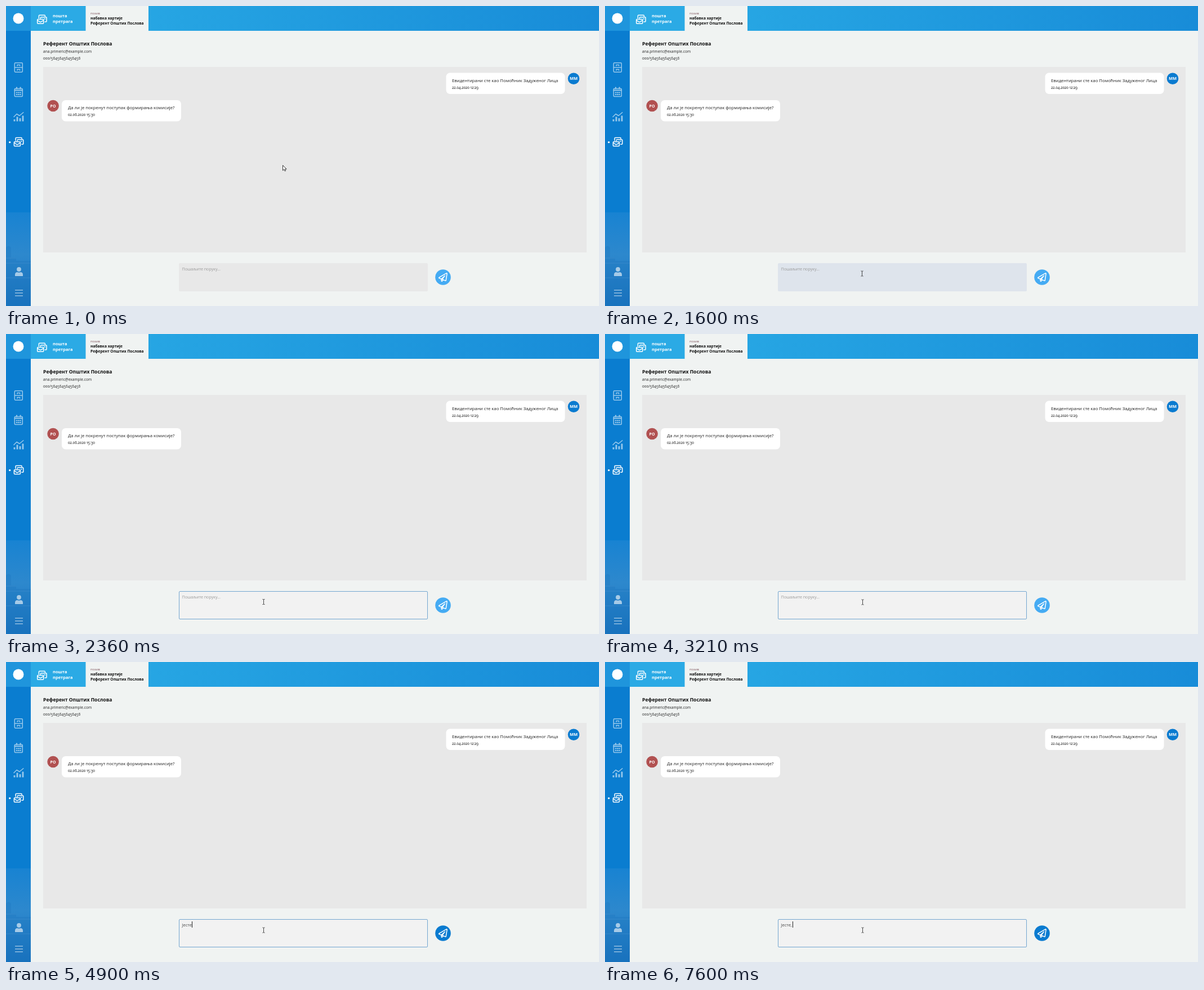
Animation, 1053 px wide and 532 px high, one loop 8000 ms. Source, as an HTML page:

```html
<!DOCTYPE html>
<html lang="sr">
<head>
<meta charset="utf-8">
<title>Порука</title>
<style>
  html, body { margin: 0; width: 100%; height: 100%; overflow: hidden; background: #f0f3f2; }
  svg { display: block; width: 100%; height: 100%; }
  text { font-family: "Open Sans", "Noto Sans", sans-serif; font-variant-numeric: oldstyle-nums; fill: #222; white-space: pre; }
  .bold { font-weight: 700; }
  .white { fill: #fff; }
  .message { font-size: 7.75px; }
  .date { font-size: 6.4px; fill: #111; }
  .contact { font-size: 6.6px; }
  .tab { font-size: 6.65px; fill: #111; }
  .nav { font-size: 7.5px; }
  .line { fill: none; stroke: #fff; stroke-width: 1.5; stroke-linejoin: round; stroke-linecap: round; }
  .dim { opacity: .58; }
</style>
</head>
<body>
<svg viewBox="0 0 1053 532">
  <defs>
    <linearGradient id="header">
      <stop offset="0" stop-color="#2aace6"/><stop offset="1" stop-color="#188cd8"/>
    </linearGradient>
    <linearGradient id="photo" x2="0" y2="1">
      <stop offset="0" stop-color="#1883d2"/><stop offset=".45" stop-color="#2d88cd"/><stop offset="1" stop-color="#1b75c0"/>
    </linearGradient>
    <g id="mail" class="line">
      <path d="M3.4 6V1.6q0-1 1-1h9q1 0 1 1v1"/>
      <path d="M6.4 6.3V5.2q0-1 1-1h8.7q1 0 1 1v6.2q0 1-1 1h-2M13.2 7.1h1.2"/>
      <rect x=".7" y="8" width="11" height="7.6" rx="1.1"/>
      <path d="M1 10l5.2 3 5.2-3"/>
    </g>
  </defs>

  <rect width="1053" height="532" fill="#f0f3f2"/>
  <rect x="44" width="1009" height="44" fill="url(#header)"/>
  <rect x="44" width="98" height="44" fill="#2baae5"/>
  <rect x="141.5" width="111.5" height="44" fill="#f0f3f2"/>

  <!-- sidebar -->
  <rect width="44" height="532" fill="#0a7dd0"/>
  <rect width="44" height="44" fill="#1f95dc"/>
  <circle cx="22" cy="22" r="9.5" fill="#fff"/>
  <rect y="366" width="44" height="166" fill="url(#photo)"/>
  <g fill="#0b62ae" opacity=".14">
    <path d="M0 446V428q5-5 9 0v18h9v6h26v80H0z"/>
    <path d="M4 462h4v15H4zM13 462h4v15h-4zM31 462h4v15h-4zM4 488h4v20H4zM13 488h4v20h-4zM31 488h4v20h-4z"/>
  </g>
  <path d="M0 447h18M0 456h44M0 482h44" stroke="#9cc9ee" opacity=".15"/>

  <g class="line dim">
    <rect x="15.3" y="100.8" width="14" height="16.4" rx="1.4"/>
    <path d="M15.3 109h14M20 106v-1.5h4.6v1.5M20 114v-1.5h4.6v1.5"/>
    <rect x="15.3" y="146.5" width="14" height="14" rx="1.2"/>
    <path d="M15.5 149.5h13.6M19 144.5v2M25.6 144.5v2" stroke-width="2.2"/>
    <path d="M18.6 153.5h1M21.8 153.5h1M25 153.5h1M18.6 157h1M21.8 157h1M25 157h1" stroke-width="1.9"/>
    <path d="M14 196.5l5-5 5 3 6.8-5.7"/>
    <path d="M15 201v3.5M20 196.5v8M25 199v5.5M30 194.5v10" stroke-width="2.8" stroke-linecap="butt"/>
  </g>
  <circle cx="6.7" cy="241.6" r="1.7" fill="#fff"/>
  <use href="#mail" x="13.7" y="232.8"/>
  <g fill="#fff" opacity=".6">
    <circle cx="23" cy="467" r="3.9"/>
    <path d="M16 479v-2.6q0-4.3 4.2-4.5 2.8 1.2 5.6 0 4.2.2 4.2 4.5V479z"/>
  </g>
  <path d="M16 503h14v1.8H16zM16 508h14v1.8H16zM16 513h14v1.8H16z" fill="#fff" opacity=".45"/>

  <!-- header -->
  <use href="#mail" x="55" y="15.6"/>
  <g class="bold">
    <text class="nav white" x="83" y="19.7">пошта</text>
    <text class="nav white" x="83" y="30.2">претрага</text>
    <text class="tab" x="150" y="23.5">набавка хартије</text>
    <text class="tab" x="150" y="33">Референт Општих Послова</text>
    <text x="66" y="69.6" font-size="8.6" style="fill:#111">Референт Општих Послова</text>
  </g>
  <text x="150" y="14.7" font-size="5.8" style="fill:#80565e">позив</text>
  <text class="contact" x="66" y="82.8">ana.primeric@example.com</text>
  <text class="contact" x="66" y="94.6">000/56456456456456</text>

  <!-- conversation -->
  <rect x="66" y="108" width="965" height="329" fill="#e8e8e8"/>
  <rect x="781.5" y="118.5" width="211" height="37.5" rx="7" fill="#fff"/>
  <text class="message" x="792" y="134.7">Евидентирани сте као Помоћник Задуженог Лица</text>
  <text class="date" x="792" y="146.8">22.04.2020 12:29</text>
  <circle cx="1008" cy="128.7" r="10.3" fill="#0a7bd0"/>
  <text class="bold white" x="1008" y="131.4" font-size="7.5" text-anchor="middle">ММ</text>
  <rect x="99" y="167" width="212" height="37.5" rx="7" fill="#fff"/>
  <text class="message" x="110" y="183.2">Да ли је покренут поступак формирања комисије?</text>
  <text class="date" x="110" y="195.2">02.06.2020 15:30</text>
  <circle cx="83.6" cy="177" r="10.3" fill="#b15151"/>
  <text class="bold white" x="83.6" y="179.6" font-size="7" text-anchor="middle">РО</text>

  <!-- composer -->
  <rect id="box" x="307.5" y="456.5" width="441" height="49" rx="1.5"/>
  <text id="hint" x="312.5" y="468.8" font-size="7.1" style="fill:#999">Пошаљите поруку...</text>
  <text id="typed" x="312.5" y="468.8" font-size="7.5" style="fill:#444"></text>
  <rect id="caret" y="460" width="1" height="11" fill="#222"/>
  <circle id="send" cx="776" cy="481" r="13.8"/>
  <path transform="translate(768 473) scale(.031)" fill="#fff" d="M440 6.5L24 246.4c-34.4 19.9-31.1 70.8 5.7 85.9L144 379.6V464c0 46.4 59.2 65.5 86.6 28.6l43.8-59.1 111.9 46.2c27 11 61-6 65.8-37.1l59.4-387.2c6.1-40.1-36.9-68.8-71.5-48.9zM192 464v-64.6l36.6 15.1zM404.6 435.3l-153.8-63.5L391 169.5c10.7-15.5-9.5-33.5-23.7-21.2L155.8 332.6 48 288 464 48z"/>

  <!-- pointer -->
  <circle id="click" cx="455.5" cy="474" r="6.3" fill="#f8f060"/>
  <path id="arrow" d="M.5 .5v9.2l2.2-2 1.5 3.1 1.5-.7-1.4-3h2.9z" fill="#fff" stroke="#222" stroke-width=".9"/>
  <path id="beam" d="M-2 -4.5h1.5l.5.5.5-.5H2M0-4V4M-2 4.5h1.5L0 4l.5.5H2" fill="none" stroke="#333" stroke-width=".9"/>
</svg>
<script>
const LOOP = 8000;
const MOVE_START = 970, MOVE_END = 1600, CLICK = 1660, CLICK_END = 1730, TICK = 63;
const TEXT = "Јесте, ";

// time, typed letters, caret x (0 = hidden)
const TYPING = [
  [0, 0, 0], [CLICK, 0, 312], [2210, 0, 0], [2740, 0, 312], [3210, 0, 0],
  [3600, 1, 315], [4130, 1, 0], [4200, 2, 319], [4430, 3, 323], [4750, 4, 326],
  [4900, 5, 330], [5440, 5, 0], [6010, 5, 330], [6450, 6, 332], [6530, 7, 333],
  [7070, 7, 0], [7600, 7, 333]
];

const el = id => document.getElementById(id);
const [box, hint, typed, caret, send, click, arrow, beam] =
  ["box", "hint", "typed", "caret", "send", "click", "arrow", "beam"].map(el);
const show = (node, on) => node.setAttribute("visibility", on ? "visible" : "hidden");
const place = (node, x, y) => node.setAttribute("transform", `translate(${x} ${y})`);

function pointerAt(t) {
  if (t < MOVE_START) return [491, 282];
  if (t >= 2430) return [457, 475.5];
  if (t >= 2360) return [457, 475];
  if (t >= MOVE_END) return [456, 474.5];
  const p = Math.floor((t - MOVE_START) / TICK) * TICK / (MOVE_END - MOVE_START);
  const eased = p * p * (3 - 2 * p);
  return [Math.round(490 - 34 * eased), Math.round(283 + 191 * eased)];
}

function render(t) {
  const [x, y] = pointerAt(t);
  const focused = t >= CLICK, hover = y > 456;
  show(arrow, !hover);
  show(beam, hover);
  place(arrow, x, y);
  place(beam, x + .5, y);
  show(click, focused && t < CLICK_END);

  const fill = focused ? "#f2f2f2" : hover ? "#dee4ec" : "#e8e8e8";
  box.setAttribute("fill", fill);
  box.setAttribute("stroke", focused ? "#74a6d0" : fill);

  const [, count, caretX] = TYPING.findLast(step => t >= step[0]);
  typed.textContent = TEXT.slice(0, count);
  show(hint, !count);
  show(caret, caretX);
  caret.setAttribute("x", caretX);
  send.setAttribute("fill", count ? "#0a7bd0" : "#45abf3");
}

const start = performance.now();
function frame() {
  render((performance.now() - start) % LOOP);
  requestAnimationFrame(frame);
}
frame();
</script>
</body>
</html>
```
